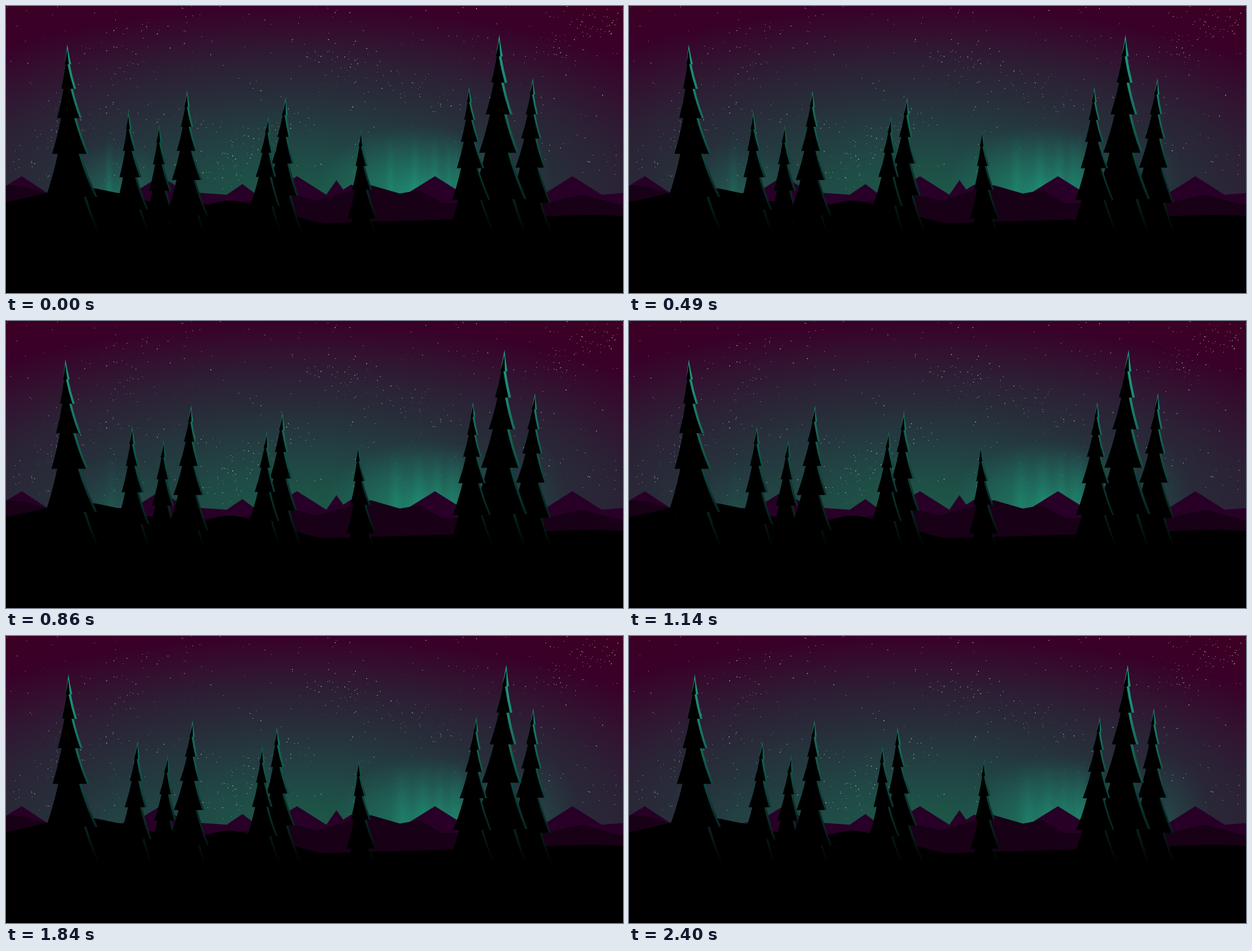
Animation of 1096 by 511 pixels, one loop 2470 ms. Source, as an HTML page:

```html
<!DOCTYPE html>
<html lang="en">
<head>
<meta charset="utf-8">
<title>Northern lights</title>
<style>
html, body { margin: 0; width: 100%; height: 100%; overflow: hidden; background: #000; }
svg { display: block; width: 100%; height: 100%; }
</style>
</head>
<body>
<svg viewBox="0 0 1096 511" preserveAspectRatio="none">
  <defs>
    <radialGradient id="sky" gradientUnits="userSpaceOnUse" cx="0" cy="0" r="420"
      gradientTransform="translate(520 340) scale(2.5 1)">
      <stop offset="0" stop-color="#1c5a48"/>
      <stop offset=".16" stop-color="#1f4c46"/>
      <stop offset=".33" stop-color="#24393f"/>
      <stop offset=".45" stop-color="#282c39"/>
      <stop offset=".57" stop-color="#2c2035"/>
      <stop offset=".69" stop-color="#33102f"/>
      <stop offset=".81" stop-color="#390029"/>
      <stop offset="1" stop-color="#3e0022"/>
    </radialGradient>
    <radialGradient id="glow">
      <stop offset="0" stop-color="#1f9c7c" stop-opacity=".85"/>
      <stop offset=".5" stop-color="#1f8a70" stop-opacity=".45"/>
      <stop offset="1" stop-color="#1f7a66" stop-opacity="0"/>
    </radialGradient>
    <linearGradient id="ray">
      <stop offset="0" stop-color="#20a884" stop-opacity="0"/>
      <stop offset=".5" stop-color="#20a884"/>
      <stop offset="1" stop-color="#20a884" stop-opacity="0"/>
    </linearGradient>
    <linearGradient id="rise" x1="0" y1="0" x2="0" y2="1">
      <stop offset="0" stop-color="#000"/>
      <stop offset=".5" stop-color="#888"/>
      <stop offset="1" stop-color="#fff"/>
    </linearGradient>
    <mask id="rayMask" maskUnits="userSpaceOnUse" x="0" y="225" width="1096" height="125">
      <rect y="225" width="1096" height="125" fill="url(#rise)"/>
    </mask>
    <linearGradient id="rim" gradientUnits="userSpaceOnUse" x1="0" y1="50" x2="0" y2="405">
      <stop offset="0" stop-color="#1f9f84"/>
      <stop offset=".25" stop-color="#1b8670"/>
      <stop offset=".45" stop-color="#146052"/>
      <stop offset=".65" stop-color="#0c4039"/>
      <stop offset=".85" stop-color="#051e1b"/>
      <stop offset="1" stop-color="#000"/>
    </linearGradient>
  </defs>
  <rect width="1096" height="511" fill="url(#sky)"/>
  <g id="stars" fill="#fff"></g>
  <g id="glows" fill="url(#glow)"></g>
  <g id="rays" fill="url(#ray)" mask="url(#rayMask)"></g>
  <path fill="#280027" d="M0 320 28 303 72 332 205 333 240 324 274 303 320 331 392 336 420 317 445 336 470 331 517 303
    569 336 587 310 599 327 613 318 650 335 700 334 717 331 762 303 800 327 905 335 960 332 1006 303 1058 336 1096 333V400H0Z"/>
  <path fill="#180016" d="M0 320 8 319 35 322 72 333 160 345 350 352 440 347 512 336 553 346 648 319 700 334 735 328
    775 351 960 350 1024 336 1096 355V400H0Z"/>
  <path d="M0 349 30 343 72 333 120 322 160 325 208 335 250 347 300 353 358 355Q396 338 435 355L520 376Q545 385 570 387
    L620 385 795 380 970 374Q1040 370 1096 374V511H0Z"/>
  <g id="trees"></g>
</svg>
<script>
const LOOP = 2470, END = 2400;
const mix = (a, b, k) => a + (b - a) * k;
const layer = id => document.getElementById(id);

function set(node, attrs) {
  for (const key in attrs) node.setAttribute(key, attrs[key]);
  return node;
}
function add(parent, name, attrs = {}) {
  return parent.appendChild(set(document.createElementNS('http://www.w3.org/2000/svg', name), attrs));
}

// Stars: an even scatter, with every other star gathered around a slanted band
let seed = 20;
const random = () => (seed = (seed * 16807) % 2147483647) / 2147483647;
const scatter = spread => (random() + random() + random() - 1.5) * spread;
const bands = [[10, 285, 350, 10], [370, 300, 490, 200], [560, 95, 770, 165], [950, 90, 1080, 10]];
const starGroups = bands.map(() => add(layer('stars'), 'g'));
for (let i = 0; i < 640; i++) {
  const [x1, y1, x2, y2] = bands[(i >> 1) % bands.length];
  const k = random();
  const gathered = i % 2;
  const size = random() < .35 ? 1.4 : 1;
  add(starGroups[i % 7 % 4], 'rect', {
    x: Math.round(gathered ? mix(x1, x2, k) + scatter(50) : k * 1096),
    y: Math.round(gathered ? mix(y1, y2, k) + scatter(50) : random() * 315),
    width: size, height: size, opacity: mix(.2, .85, random())
  });
}

// Aurora: soft glows on the horizon and a curtain of rays crowding to the right
const [mainGlow, leftGlow, rightGlow] = [0, 1, 2].map(() => add(layer('glows'), 'ellipse', { cy: 335 }));
const RAYS = 5;
const curtain = Array.from({ length: RAYS }, () => add(layer('rays'), 'rect', { y: 225, height: 125 }));
const loneRay = add(layer('rays'), 'rect', { y: 225, height: 125 });

const drawRay = (node, x, width, opacity) => set(node, { x: x - width / 2, width, opacity });

function drawAurora(u) {
  const fade = Math.max(0, 1 - 1.8 * u);
  set(mainGlow, { cx: mix(735, 760, u), rx: mix(190, 175, u), ry: 125, opacity: mix(1, .8, u) });
  set(leftGlow, { cx: 195, rx: 115, ry: 95, opacity: .1 + .45 * fade });
  set(rightGlow, { cx: mix(930, 950, u), rx: mix(50, 85, u), ry: 130, opacity: mix(.1, .28, u) });
  drawRay(loneRay, 183 + 10 * u, mix(18, 40, u), .28 * fade);
  curtain.forEach((node, i) => {
    const gap = Math.pow(1 - i / (RAYS - 1), 1.6);
    drawRay(node, mix(800, 806, u) - mix(117, 97, u) * gap, mix(20, 30, u) + 20 * gap * u, .3);
  });
}

// Trees, back to front: [root x, top y, height]
const trees = [
  [118, 68, 336], [227, 187, 301], [277, 211, 300], [321.5, 150, 275], [486, 162, 302],
  [456, 196, 276], [635, 221, 271], [929.5, 128, 275], [875.5, 51, 362], [827, 144, 249]
].map(([root, top, height]) => ({
  root, top, height,
  rim: add(layer('trees'), 'path', { fill: 'url(#rim)' }),
  body: add(layer('trees'), 'path')
}));

// Each tier is longer than the one above by a fixed ratio, and as wide as it is low
const TIERS = 6, RATIO = 1.208, BREADTH = .168;
const tierEnd = i => .107 * (RATIO ** i - 1) / (RATIO - 1);

function treePath({ root, top, height }, lean, inset) {
  const center = f => root + lean * Math.max(0, 1 - f) ** 1.15;
  const point = (x, y) => x.toFixed(2) + ' ' + y.toFixed(2);
  let d = '';
  for (let i = 0; i < TIERS; i++) {
    const f0 = tierEnd(i), f1 = tierEnd(i + 1);
    const y0 = top + height * f0 + (i ? -1 : inset * 2), y1 = top + height * f1;
    const w0 = BREADTH * height * f0, w1 = BREADTH * height * f1;
    const left0 = center(f0) - w0 * .68, left1 = center(f1) - w1;
    const right0 = center(f0) + w0 * .56 - (i ? inset : 0), right1 = center(f1) + w1 - inset;
    const bend = mix(y0, y1, .52);
    d += `M${point(left0, y0)}Q${point(mix(left0, left1, .4), bend)} ${point(left1, y1)}` +
      `L${point(right1, y1)}Q${point(mix(right0, right1, .4), bend)} ${point(right0, y0)}Z`;
  }
  return d;
}

// One gust travels across the forest, so the phase follows the position
function drawTree(tree, seconds) {
  const lean = .037 * tree.height * Math.sin(.92 * seconds + .0114 * tree.root - 3.65);
  set(tree.rim, { d: treePath(tree, lean, 0) });
  set(tree.body, { d: treePath(tree, lean, tree.height * .0125) });
}

// The picture advances in steps of 70 ms, with two shorter ones
function hold(t) {
  const base = t < 520 ? 0 : t < 720 ? 520 : 720;
  return base + Math.floor((t - base) / 70) * 70;
}

function draw(t) {
  const time = hold(t);
  drawAurora(time / END);
  trees.forEach(tree => drawTree(tree, time / 1000));
  starGroups.forEach((group, i) =>
    set(group, { opacity: .88 + .12 * Math.sin(time / 200 + i * 1.6) }));
}

const start = performance.now();
function tick() {
  draw((performance.now() - start) % LOOP);
  requestAnimationFrame(tick);
}
tick();
</script>
</body>
</html>
```
